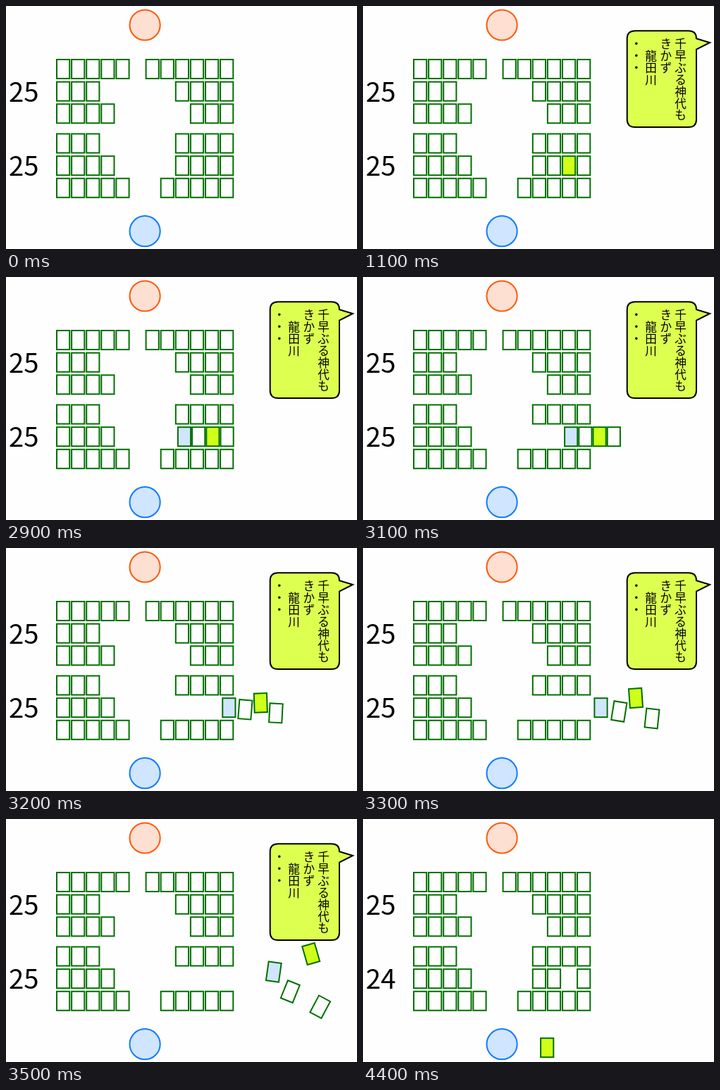
An HTML page that plays this animation: 498x345 px, repeating every 6000 ms.

```html
<!DOCTYPE html>
<html lang="ja">
<head>
<meta charset="utf-8">
<title>Card sweep</title>
<style>
  html, body { margin: 0; width: 100%; height: 100%; overflow: hidden; background: #fefefe; }
  svg { display: block; width: 498px; height: 345px; }
  text { font-family: "Noto Sans CJK JP", "Noto Sans CJK", sans-serif; fill: #000; }
  .count { font-size: 38.3px; }
  .verse { font-size: 16.6px; text-anchor: middle; }
  .card { fill: #fefefe; stroke: #007000; stroke-width: 2; }
</style>
</head>
<body>
<svg id="stage" viewBox="0 0 498 345">
  <circle cx="197.1" cy="27" r="21.6" fill="#fde0d2" stroke="#ff5a0a" stroke-width="2"/>
  <circle cx="197.1" cy="319.7" r="21.6" fill="#d0e5ff" stroke="#0f7bff" stroke-width="2"/>
  <text class="count" x="4" y="135.8">25</text>
  <text class="count" id="ownCount" x="4" y="241.4">25</text>
  <g id="cards"></g>
  <g id="bubble">
    <path d="M386 35.3H462Q473 35.3 473 46.3L492 52L473 61.5V161Q473 172 462 172H386Q374.7 172 374.7 161V46.3Q374.7 35.3 386 35.3Z"
      fill="#dcff50" stroke="#000" stroke-width="2" stroke-linejoin="miter"/>
  </g>
</svg>
<script>
const LOOP = 6000, READ = 1100, TOUCH = 2200, SWEEP = 2900, TAKE = 4400;
const STEP = 100, LAST_STEP = 7;
const WHITE = '#fefefe', YELLOW = '#d0ff1a', BLUE = '#d0e5ff';
const PITCH = 21.1, FIRST_X = 81.1, ROW_Y = 226.7;
const $ = id => document.getElementById(id);

function add(parent, tag, attrs, text = '') {
  const node = document.createElementNS('http://www.w3.org/2000/svg', tag);
  for (const name in attrs) node.setAttribute(name, attrs[name]);
  node.textContent = text;
  return parent.appendChild(node);
}

const columnX = k => FIRST_X + PITCH * k;
const addCard = () => add($('cards'), 'rect', { class: 'card', x: -9.1, y: -13.5, width: 18.2, height: 27 });
const place = (card, [x, y, turn = 0]) =>
  card.setAttribute('transform', `translate(${x} ${y}) rotate(${turn})`);

// Row centre, cards on the left, cards on the right
const rows = [
  [89.5, 5, 6], [121.2, 3, 4], [152.8, 4, 3],
  [195, 3, 4], [ROW_Y, 4, 0], [258.3, 5, 5]
];
for (const [y, left, right] of rows) {
  for (let k = 0; k < 12; k++) {
    if (k < left || k >= 12 - right) place(addCard(), [columnX(k), y]);
  }
}

// Poses [x, y, angle] once the pushed cards scatter, at steps 5 and 7
const scatter = [
  [[337.5, 226.7, 0], [379.8, 217, 8]],
  [[363.3, 232, 9], [403.3, 245, 22]],
  [[387, 213, -4], [432.7, 191.5, -16]],
  [[410, 242, 6], [445.7, 266.7, 28]]
];
const swept = scatter.map((ends, i) => {
  const x = 253 + 20.2 * i;
  return {
    node: addCard(),
    rest: [columnX(8 + i), ROW_Y, 0],
    path: [[x, ROW_Y, 0], [x + 2 * PITCH, ROW_Y, 0], ...ends]
  };
});

function poseAt(path, step) {
  const at = (step - 1) / 2;
  const i = Math.min(Math.floor(at), path.length - 2);
  return path[i].map((v, n) => v + (path[i + 1][n] - v) * (at - i));
}

// Vertical verse: column x, first character's slot, characters
const verse = [[450.5, 0, '千早ぶる神代も'], [429.7, 0, 'きかず'], [408.5, 1, '龍田川'], [387.8, 0, '・・・']];
for (const [x, start, line] of verse) {
  [...line].forEach((char, i) =>
    add($('bubble'), 'text', { class: 'verse', x, y: 60 + 16.9 * (start + i) }, char));
}

function draw(t) {
  const reading = t >= READ && t < TAKE;
  const taken = t >= TAKE;
  const step = t < SWEEP || taken ? 0 : Math.min(Math.floor((t - SWEEP) / STEP) + 1, LAST_STEP);
  $('bubble').style.display = reading ? '' : 'none';
  $('ownCount').textContent = taken ? '24' : '25';
  swept.forEach(({ node, rest, path }, i) => {
    place(node, step ? poseAt(path, step) : rest);
    node.style.fill = i === 0 && t >= TOUCH && !taken ? BLUE
      : i === 2 && t >= READ ? YELLOW : WHITE;
  });
  if (taken) place(swept[2].node, [261.2, 324.7]);
}

const begin = performance.now();
function tick() {
  draw((performance.now() - begin) % LOOP);
  requestAnimationFrame(tick);
}
tick();
</script>
</body>
</html>
```
